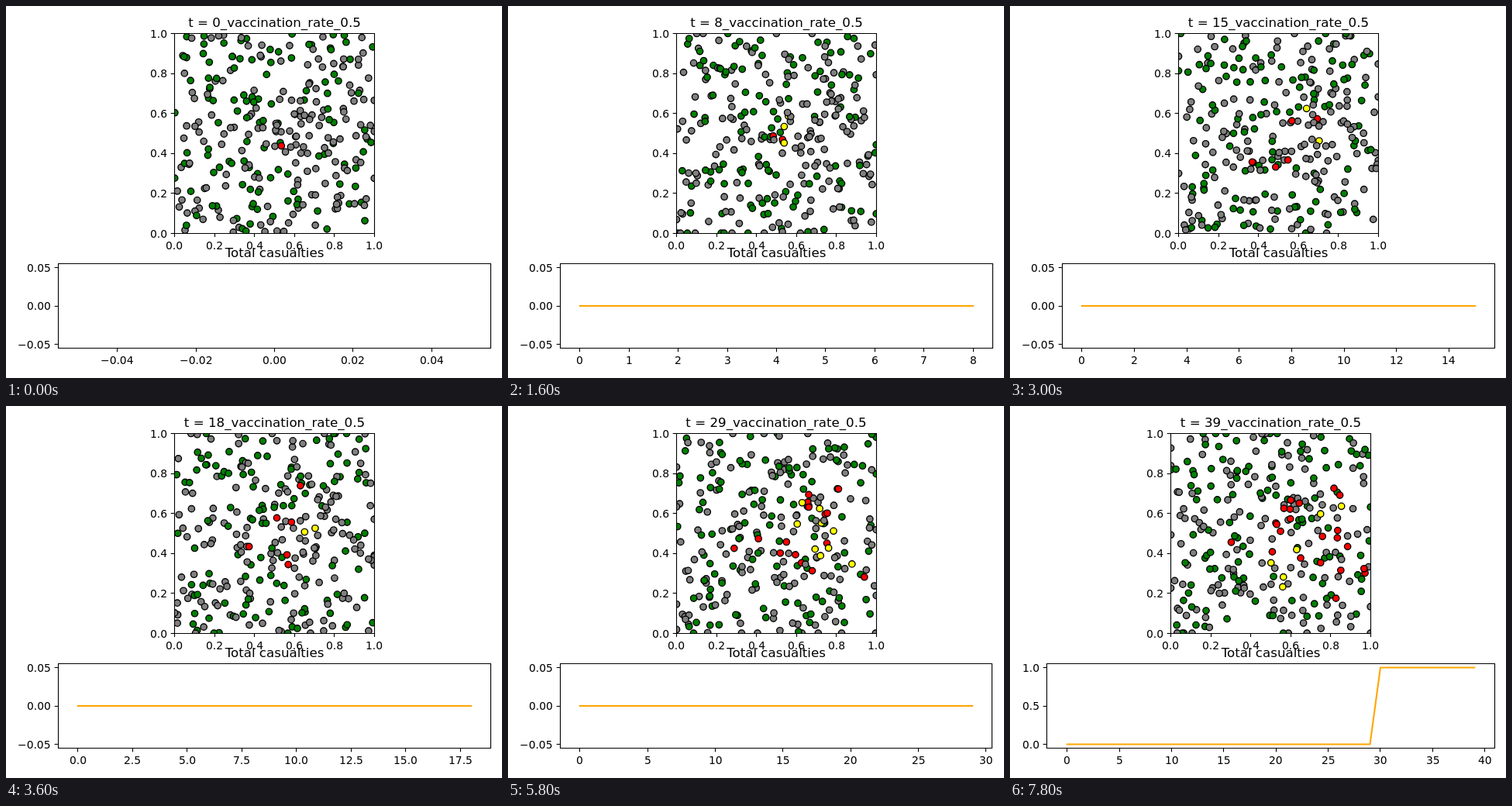
Animation, 640 px wide and 480 px high, one loop 8000 ms. Source, as an HTML page:

```html
<!DOCTYPE html>
<html lang="en">
<head>
<meta charset="utf-8">
<title>Vaccination simulation</title>
<style>
  html, body { margin: 0; width: 100%; height: 100%; overflow: hidden; background: #fff; }
  svg { display: block; width: 640px; height: 480px; }
  text { font: 13.889px "DejaVu Sans", sans-serif; }
  .title { font-size: 16.667px; text-anchor: middle; }
  .axis { fill: none; stroke: #000; stroke-width: 1.11; }
  .curve { fill: none; stroke: orange; stroke-width: 2.08; stroke-linejoin: round; stroke-linecap: square; }
  circle { stroke: #000; stroke-width: 1.39; }
</style>
</head>
<body>
<svg id="figure" viewBox="0 0 640 480"></svg>
<script>
const STEPS = 40, STEP_MS = 200;
const HEALTHY = 250, VACCINATED = 0.42, CARRIERS = 34, ILLNESS = 30;
const FONT = 13.889, TICK = 4.86, LABEL_GAP = 9.72;
const figure = document.getElementById('figure');

let seed = 20;
function random() {
  seed = (seed + 0x6D2B79F5) | 0;
  let r = Math.imul(seed ^ (seed >>> 15), 1 | seed);
  r = (r + Math.imul(r ^ (r >>> 7), 61 | r)) ^ r;
  return ((r ^ (r >>> 14)) >>> 0) / 4294967296;
}
const spread = width => (random() * 2 - 1) * width;
const clamp = v => Math.min(1, Math.max(0, v));
const snap = v => Math.floor(v) + 0.5;

function interpolate(keys, x) {
  const i = Math.max(1, keys.findIndex(k => k[0] >= x));
  const [x0, y0] = keys[i - 1], [x1, y1] = keys[i];
  return y0 + (y1 - y0) * (x - x0) / (x1 - x0);
}

// Random walk between the walls, run both ways from a known place and step.
function walk(start, at = 0) {
  const path = [];
  path[at] = start;
  const move = p => p.map(v => clamp(v + spread(0.05)));
  for (let s = at + 1; s < STEPS; s++) path[s] = move(path[s - 1]);
  for (let s = at - 1; s >= 0; s--) path[s] = move(path[s + 1]);
  return path;
}

const crowd = Array.from({ length: HEALTHY }, () => ({
  color: random() < VACCINATED ? 'green' : 'gray',
  path: walk([random(), random()])
}));

// When the n-th person is infected, and where the outbreak is by then.
const onsetOf = [[1, 0], [5, 8], [7, 12], [8, 18], [17, 24], [24, 29], [34, 39]];
const outbreakX = [[0, 0.535], [12, 0.58], [24, 0.74], [39, 0.69]];
const outbreakY = [[0, 0.437], [8, 0.51], [24, 0.53], [39, 0.44]];

const carriers = Array.from({ length: CARRIERS }, (_, k) => {
  const onset = Math.ceil(interpolate(onsetOf, k + 1));
  const place = [outbreakX, outbreakY].map(keys => interpolate(keys, onset) + spread(onset * 0.006));
  return { onset, incubation: k ? 3 + (k * 3) % 7 : 0, path: walk(place, onset) };
});

function carrierColor({ onset, incubation }, step) {
  const age = step - onset;
  if (age < 0 || age >= ILLNESS) return 'gray';
  return age < incubation ? 'yellow' : 'red';
}

const path = (cls, d) => `<path class="${cls}" d="${d}"/>`;
const frame = (l, t, r, b) => path('axis', `M${l} ${t}H${r}V${b}H${l}Z`);
const title = (x, y, s) => `<text class="title" x="${x}" y="${y}">${s}</text>`;
const format = (v, digits) => v.toFixed(digits).replace('-', '\u2212');

function labelWidth(s) {
  const em = { '.': 0.318, '\u2212': 0.838 };
  return FONT * [...s].reduce((sum, c) => sum + (em[c] || 0.636), 0);
}
// Labels start on whole pixels; align 0.5 centres them on x, 1 ends them there.
function label(x, y, s, align) {
  return `<text x="${Math.round(x - labelWidth(s) * align)}" y="${Math.round(y)}">${s}</text>`;
}
function xTick(x, y, s) {
  return path('axis', `M${snap(x)} ${y}v${TICK}`) + label(x, y + LABEL_GAP + 10.8, s, 0.5);
}
function yTick(x, y, s) {
  return path('axis', `M${x} ${snap(y)}h${-TICK}`) + label(x - LABEL_GAP, y + 5.3, s, 1);
}

// Round tick spacing giving at most nine intervals.
function tickSpacing(span) {
  const raw = span / 9, power = 10 ** Math.floor(Math.log10(raw));
  return [1, 2, 2.5, 5, 10].find(m => m * power >= raw - 1e-9) * power;
}

function timeAxis(step, left) {
  const min = step ? -0.05 * step : -0.055, max = step ? 1.05 * step : 0.055;
  const spacing = tickSpacing(max - min);
  const isWhole = v => Math.abs(v - Math.round(v)) < 1e-6;
  const digits = [0, 1, 2].find(d => isWhole(spacing * 10 ** d));
  const ticks = [];
  for (let i = Math.ceil(min / spacing); i * spacing <= max; i++) {
    ticks.push({ value: i * spacing, text: format(i * spacing, digits) });
  }
  const share = v => (v - min) / (max - min);
  // The axis shrinks when its last label would leave the margin.
  const last = ticks.at(-1);
  const room = 625.3 - labelWidth(last.text) / 2 - left;
  const right = snap(Math.min(625.5, left + room / share(last.value)));
  return { ticks, right, x: v => left + share(v) * (right - left) };
}

function casualties(step, left, axis) {
  const top = 332.5, bottom = 441.5, high = 337.45, low = 436.55, middle = 387;
  const died = step >= ILLNESS;
  const rows = died ? ['1.0', '0.5', '0.0'] : ['0.05', '0.00', '\u22120.05'];
  let out = axis.ticks.map(t => xTick(axis.x(t.value), bottom, t.text)).join('');
  out += rows.map((s, i) => yTick(left, high + i * (middle - high), s)).join('');
  if (step) {
    let d = `M${axis.x(0)} ${died ? low : middle}H${axis.x(died ? ILLNESS - 1 : step)}`;
    if (died) d += `L${axis.x(ILLNESS)} ${high}H${axis.x(step)}`;
    out += path('curve', d);
  }
  return out + frame(left, top, axis.right, bottom)
    + title((left + axis.right) / 2, 324, 'Total casualties');
}

function population(step, center) {
  const left = snap(center - 129), top = 35.5, size = 257.7, bottom = 293.2;
  const dot = ([x, y], color) =>
    `<circle cx="${(left + x * size).toFixed(2)}" cy="${(bottom - y * size).toFixed(2)}" r="4.17" fill="${color}"/>`;
  // The first carrier does not recover.
  const alive = carriers.slice(step < ILLNESS ? 0 : 1);
  const dots = crowd.map(p => dot(p.path[step], p.color))
    .concat(alive.map(p => dot(p.path[step], carrierColor(p, step)))).join('');
  let out = `<clipPath id="box"><rect x="${left}" y="${top}" width="${size}" height="${size}"/></clipPath>`
    + `<g clip-path="url(#box)">${dots}</g>`;
  for (let i = 0; i <= 5; i++) {
    const v = i / 5, s = v.toFixed(1);
    out += xTick(left + v * size, bottom, s) + yTick(left, bottom - v * size, s);
  }
  return out + frame(left, top, left + 258, 293.5)
    + title(center, 27, `t = ${step}_vaccination_rate_0.5`);
}

let shown = -1;
function draw() {
  const step = Math.floor(performance.now() / STEP_MS) % STEPS;
  if (step !== shown) {
    shown = step;
    const left = step < ILLNESS ? 67.5 : 47.5;
    const axis = timeAxis(step, left);
    figure.innerHTML = population(step, (left + axis.right) / 2) + casualties(step, left, axis);
  }
  requestAnimationFrame(draw);
}
draw();
</script>
</body>
</html>
```
